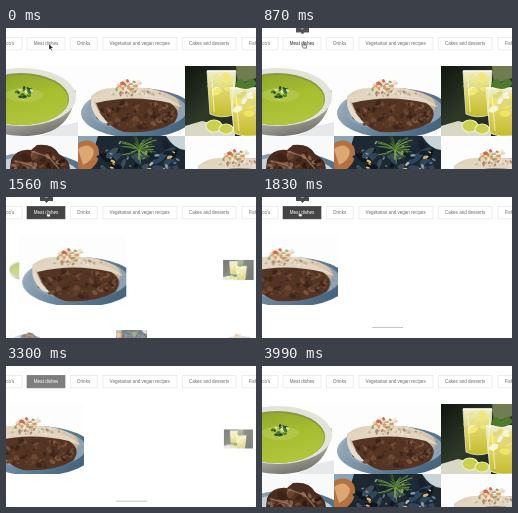
An HTML page for the animation above (4.02 s loop, 250 by 141 pixels).

```html
<!DOCTYPE html>
<html lang="en">
<head>
<meta charset="utf-8">
<title>Recipe filter</title>
<style>
  html, body { margin: 0; width: 100%; height: 100%; overflow: hidden; background: #fff; }
  #stage { position: relative; width: 250px; height: 141px; overflow: hidden; background: #fff; }
  #stage svg { position: absolute; left: 0; top: 0; display: block; }
  .loop, .tile { animation: 4020ms infinite linear; }

  #grid { position: absolute; left: 0; top: 38px; width: 250px; overflow: hidden; animation-name: shrink; }
  .tile { position: absolute; width: 107px; height: 70px; overflow: hidden; animation-name: hide, fade; }
  #kept { z-index: 1; animation-name: slide; }
  #rule { position: absolute; left: 110px; top: 123px; width: 31px; height: 1px; background: #c4c4c4; animation-name: drop; }
  .soft { filter: blur(.4px); }

  text { font: 4.55px "Liberation Sans", Arial, sans-serif; fill: #6c6c6c; }
  .btn { fill: #fff; stroke: #e2e2e2; stroke-width: .6; }
  #pick { animation-name: pick; }
  #pickText { animation-name: pickText; }
  .tip text { fill: #fff; text-anchor: middle; }
  #tipA { animation-name: tipA; }
  #tipB { animation-name: tipB; }
  #cursor { animation-name: point; }
  #arrow { animation-name: arrow; }
  #hand { animation-name: hand; }
  #ring { transform-origin: 41px 15px; animation-name: ring; }

  /* Filtering runs at 1308 ms and is undone at 3187 ms */
  @keyframes hide {
    0%, 32.54% { transform: scale(1); animation-timing-function: ease; }
    47.46%, 79.28% { transform: scale(0); animation-timing-function: ease; }
    94.2%, 100% { transform: scale(1); }
  }
  @keyframes fade {
    0%, 32.54% { opacity: 1; }
    47.46%, 79.28% { opacity: 0; animation-timing-function: cubic-bezier(0, .5, .5, 1); }
    94.2%, 100% { opacity: 1; }
  }
  @keyframes slide {
    0%, 34.08% { transform: none; animation-timing-function: ease; }
    49%, 81.05% { transform: translateX(-107px); animation-timing-function: ease; }
    95.97%, 100% { transform: none; }
  }
  @keyframes shrink {
    0%, 34.08% { height: 280px; animation-timing-function: ease; }
    49%, 81.05% { height: 70px; animation-timing-function: ease; }
    95.97%, 100% { height: 280px; }
  }
  @keyframes drop {
    0%, 34.08% { transform: translateY(210px); animation-timing-function: ease; }
    49%, 81.05% { transform: none; animation-timing-function: ease; }
    95.97%, 100% { transform: translateY(210px); }
  }
  @keyframes pick {
    0%, 32.34% { fill: #fff; stroke: #e2e2e2; animation-timing-function: ease; }
    38.3%, 80.85% { fill: #444; stroke: #444; animation-timing-function: ease; }
    87%, 100% { fill: #fff; stroke: #e2e2e2; }
  }
  @keyframes pickText {
    0%, 15.4% { fill: #6c6c6c; }
    20%, 32.34% { fill: #2c2c2c; }
    36%, 82.5% { fill: #fff; }
    87%, 100% { fill: #6c6c6c; }
  }
  @keyframes tipA {
    0%, 15.4% { transform: translateY(9px); opacity: 0; animation-timing-function: ease; }
    24%, 52.7% { transform: none; opacity: 1; animation-timing-function: ease; }
    57%, 100% { transform: translateY(9px); opacity: 0; }
  }
  @keyframes tipB {
    0%, 54.9% { transform: translateY(9px); opacity: 0; animation-timing-function: ease; }
    57.3% { transform: translateY(4.6px); opacity: .95; }
    62%, 63.5% { transform: none; opacity: 1; }
    67%, 100% { transform: translateY(9px); opacity: 0; }
  }
  @keyframes point {
    0% { transform: translate(43px, 16px); opacity: 1; }
    7.46%, 13% { transform: translate(41.6px, 15.2px); opacity: 1; }
    17%, 43.5% { transform: translate(41px, 14.5px); opacity: 1; }
    57.46% { transform: translate(12.4px, 13.2px); opacity: 1; }
    63.4% { transform: translate(-8px, 12.4px); opacity: 1; }
    63.5%, 100% { transform: translate(-8px, 12.4px); opacity: 0; }
  }
  @keyframes arrow { 0%, 15.4% { opacity: 1; } 15.41%, 100% { opacity: 0; } }
  @keyframes hand { 0%, 15.4% { opacity: 0; } 15.41%, 100% { opacity: 1; } }
  @keyframes ring {
    0%, 7.46% { transform: scale(.5); opacity: 0; }
    8.5% { transform: scale(.7); opacity: 1; }
    10.2%, 11.5% { transform: scale(1); opacity: 1; }
    15%, 100% { transform: scale(1.1); opacity: 0; }
  }
</style>
</head>
<body>
<div id="stage">
  <svg width="0" height="0">
    <defs>
      <linearGradient id="bowlShade" x2=".6" y2="1">
        <stop offset="0" stop-color="#dcdcd6"/><stop offset=".6" stop-color="#b9b8b0"/><stop offset="1" stop-color="#77766e"/>
      </linearGradient>
      <linearGradient id="soupShade" x1=".2" x2=".7" y2="1">
        <stop offset="0" stop-color="#8ea62c"/><stop offset=".5" stop-color="#a5bd2f"/><stop offset="1" stop-color="#b3c63c"/>
      </linearGradient>
      <linearGradient id="plateShade" x2="1" y2=".4">
        <stop offset="0" stop-color="#a9b8c4"/><stop offset=".5" stop-color="#6f8a9f"/><stop offset="1" stop-color="#46657f"/>
      </linearGradient>
      <linearGradient id="breadShade" x2="0" y2="1">
        <stop offset="0" stop-color="#e6dac6"/><stop offset="1" stop-color="#b9a082"/>
      </linearGradient>
      <linearGradient id="nightShade" x2="1" y2=".7">
        <stop offset="0" stop-color="#10150f"/><stop offset=".45" stop-color="#2f3a2a"/><stop offset="1" stop-color="#141a12"/>
      </linearGradient>
      <linearGradient id="juiceShade" x2="0" y2="1">
        <stop offset="0" stop-color="#eef0cf"/><stop offset=".4" stop-color="#dfd86a"/><stop offset="1" stop-color="#c4bb2c"/>
      </linearGradient>

      <g id="soup">
        <rect width="107" height="70" fill="#fdfdfd"/>
        <path d="M70 70 90 60 107 56V70Z" fill="#e6e8e9"/>
        <path d="M-2 28C0 58 24 70 52 70S102 60 105 24Z" fill="url(#bowlShade)"/>
        <ellipse cx="51" cy="31" rx="54" ry="29" fill="#e3e3dc"/>
        <ellipse cx="50" cy="33" rx="48" ry="26" fill="#8a9a3c"/>
        <ellipse cx="50" cy="34" rx="47" ry="25" fill="url(#soupShade)"/>
        <path d="M33 28Q53 15 73 28 68 37 53 36 38 36 33 28Z" fill="#bccb58" opacity=".6"/>
        <g class="herbs soft"></g>
      </g>

      <g id="wrap">
        <rect width="107" height="70" fill="#fdfdfd"/>
        <ellipse cx="60" cy="47" rx="57" ry="25" fill="url(#plateShade)"/>
        <ellipse cx="59" cy="44" rx="50" ry="20" fill="#8ca2b3"/>
        <path d="M13 30Q24 20 42 22 78 19 98 32 105 38 98 48L26 51Q13 40 13 30Z" fill="url(#breadShade)"/>
        <g class="salsa soft"></g>
        <path d="M13 30Q36 22 64 26 90 29 104 41 82 34 59 34L25 38Q15 38 13 30Z" fill="#e2d6c3"/>
        <g class="grill soft"></g>
        <path d="M18 37Q54 28 92 37 105 45 96 57 76 68 46 66 27 61 18 37Z" fill="#543524"/>
        <g class="meat soft"></g>
        <path d="M14 31Q19 46 30 57 24 59 17 49 11 39 14 31Z" fill="#e6dccd"/>
      </g>

      <g id="drink">
        <rect width="107" height="70" fill="url(#nightShade)"/>
        <path d="M51 0H71V12L53 18Z" fill="#8f9a62" opacity=".7"/>
        <path d="M0 60 17 55 50 62 50 70H0Z" fill="#d7d9c6"/>
        <path d="M22 5H51L48 49Q36 53 25 48Z" fill="url(#juiceShade)" stroke="#e9edda" stroke-width=".8"/>
        <path d="M45 22H82L77 68Q62 73 49 67Z" fill="url(#juiceShade)" stroke="#edf0e0" stroke-width=".9"/>
        <g class="ice soft"></g>
        <path d="M22 5h29M45 22h37" stroke="#fafaf0" stroke-width="1.4"/>
        <path d="M50 20Q54 7 60 17 67 8 72 18 62 27 50 20Z" fill="#4e7a2c"/>
        <path d="M27 12l2 34m20-32-2 33m4-18 3 36" stroke="#fbfbe0" stroke-width="1.2" opacity=".6"/>
        <g fill="#c9d04e" stroke="#eef0b4" stroke-width="1.2">
          <ellipse cx="29" cy="60" rx="8" ry="6"/><ellipse cx="41" cy="63" rx="7" ry="5"/>
        </g>
      </g>

      <g id="roast">
        <rect width="107" height="70" fill="#f8f9fa"/>
        <ellipse cx="62" cy="44" rx="58" ry="28" fill="url(#plateShade)"/>
        <ellipse cx="61" cy="42" rx="49" ry="22" fill="#c5d2dc"/>
        <path d="M40 24Q46 12 60 14L66 9Q82 7 88 18 102 25 98 40L60 60 38 42Z" fill="#4a2c1e"/>
        <g class="roastMeat soft"></g>
        <path d="M60 15 78 21 88 33M44 25 60 29 70 38" fill="none" stroke="#b98f76" stroke-width="1.3" opacity=".6"/>
      </g>

      <g id="mussels">
        <rect width="107" height="70" fill="#1d2831"/>
        <path d="M0 0H20L9 37H0Z" fill="#8aa3b5"/>
        <path d="M0 7Q13 0 20 11 24 24 13 33L0 36Z" fill="#b3713f"/>
        <path d="M0 13Q11 5 16 15 16 24 5 29Z" fill="#d9a873"/>
        <g class="shells soft"></g>
        <g class="dill" fill="none" stroke-width=".9"></g>
        <path d="M88 0H107V14Q96 13 88 0Z" fill="#c9d4da"/>
      </g>
    </defs>
  </svg>

  <div id="grid" class="loop"></div>
  <div id="rule" class="loop"></div>

  <svg width="250" height="141" viewBox="0 0 250 141">
    <g id="bar"></g>
    <g id="tipA" class="tip loop">
      <path d="M34-6H47V4H42.3L40.5 6 38.7 4H34Z" fill="#484848"/><text x="40.5" y=".5">2</text>
    </g>
    <g id="tipB" class="tip loop">
      <path d="M-5-6H8V4H3.3L1.5 6-.3 4H-5Z" fill="#484848"/><text x="1.8" y=".5">3</text>
    </g>
    <circle id="ring" class="loop" cx="41" cy="15" r="7.8" fill="none" stroke="#444" stroke-width=".8"/>
    <g id="cursor" class="loop">
      <path id="arrow" class="loop" d="M0 0V5.6L1.3 4.4 2.2 6.3 3.1 5.9 2.3 4.1H4Z" fill="#111" stroke="#fff" stroke-width=".35"/>
      <path id="hand" class="loop" d="M0 .5Q.6-.2 1.1.5V2.3L3.3 2.8Q3.8 3 3.7 3.6L3.2 5.6H.6L-1.1 3.5Q-.9 2.8 0 3.2Z" fill="#fff" stroke="#111" stroke-width=".6"/>
    </g>
  </svg>
</div>

<script>
  const NS = "http://www.w3.org/2000/svg";
  const $ = s => document.querySelector(s);

  function add(parent, tag, attrs) {
    const el = document.createElementNS(NS, tag);
    for (const k in attrs) el.setAttribute(k, attrs[k]);
    parent.append(el);
    return el;
  }

  function seeded(n) {
    return () => (n = (n * 16807) % 2147483647) / 2147483647;
  }

  // Scatter small ellipses inside an elliptical patch
  function scatter(sel, seed, count, [cx, cy, rx, ry], [min, max], colors, flat = .62) {
    const rnd = seeded(seed), box = $(sel);
    rnd();
    for (let i = 0; i < count; i++) {
      const a = rnd() * 2 * Math.PI, d = Math.sqrt(rnd()), r = min + rnd() * (max - min);
      const x = cx + Math.cos(a) * d * rx, y = cy + Math.sin(a) * d * ry;
      add(box, "ellipse", {
        cx: x, cy: y, rx: r, ry: r * flat, fill: colors[Math.floor(rnd() * colors.length)],
        transform: `rotate(${rnd() * 140 - 70} ${x} ${y})`
      });
    }
  }

  // Feathery sprigs fanning out from one stem
  function sprigs(sel, seed, count, cx, cy) {
    const rnd = seeded(seed), greens = ["#5f8a3c", "#7ba04b", "#3f6b2d"];
    rnd();
    for (let i = 0; i < count; i++) {
      const a = rnd() * 2 * Math.PI, len = 6 + rnd() * 9;
      const dx = Math.cos(a) * len * 1.5, dy = Math.sin(a) * len;
      add($(sel), "path", {
        d: `M${cx} ${cy}q${dx * .4} ${dy * .8} ${dx} ${dy}`, stroke: greens[i % 3]
      });
    }
  }

  const browns = ["#5f3d2a", "#6d4833", "#3c251a", "#4f3223", "#7a543c", "#452a1d"];
  scatter(".herbs", 71, 24, [53, 27, 9, 5.5], [1, 2.6], ["#2b5a22", "#477a28", "#dfe6b4", "#20481e"]);
  scatter(".salsa", 37, 40, [51, 20, 14, 5], [1.4, 3.2], ["#cf6a4a", "#dd9a62", "#8fa565", "#efe7da", "#e6d7bd"]);
  scatter(".grill", 43, 30, [62, 27, 30, 4], [.7, 2], ["#c9b294", "#a98a66", "#efe6d8"]);
  scatter(".meat", 19, 110, [59, 49, 38, 14], [1, 3.6], browns);
  scatter(".roastMeat", 53, 60, [68, 31, 26, 16], [1.5, 5], ["#3c2318", "#54331f", "#6b4532", "#2e1a13", "#85604a"]);
  scatter(".ice", 29, 12, [36, 18, 10, 10], [2, 5], ["#f6f5dc", "#f1e775", "#e2dc92"]);
  scatter(".ice", 61, 16, [63, 38, 12, 13], [2, 6], ["#f6f5dc", "#f1e460", "#e0d878"]);
  scatter(".shells", 91, 60, [59, 34, 43, 34], [4, 9], ["#0e161f", "#1c2b39", "#2f475c", "#15212b", "#3c4e59"], .4);
  scatter(".shells", 23, 36, [60, 31, 42, 29], [1, 3], ["#c98a4d", "#a9b6bc", "#dcb374", "#5a7f9b", "#7f97a6"], .5);
  sprigs(".dill", 17, 42, 61, 13);

  const tiles = [
    ["soup", -35, 0], ["drink", 179, 0], ["roast", -35, 70],
    ["mussels", 72, 70], ["wrap", 179, 70], ["wrap", 72, 0, "kept"]
  ];
  for (const [pic, x, y, id] of tiles) {
    const tile = document.createElement("div");
    tile.className = "tile";
    if (id) tile.id = id;
    tile.style.left = x + "px";
    tile.style.top = y + "px";
    const svg = add(tile, "svg", { width: 107, height: 70, viewBox: "0 0 107 70" });
    add(svg, "use", { href: "#" + pic });
    $("#grid").append(tile);
  }

  const filters = [
    ["Taco's", -12, 16, -4.6], ["Meat dishes", 21, 59, 27.8], ["Drinks", 64.7, 91.2, 71.3],
    ["Vegetarian and vegan recipes", 97, 171, 103.6], ["Cakes and desserts", 176.6, 230, 183],
    ["Fish", 236, 259, 242.8]
  ];
  filters.forEach(([label, left, right, textX], i) => {
    const rect = add($("#bar"), "rect", { class: "btn", x: left, y: 9.3, width: right - left, height: 12.6 });
    const text = add($("#bar"), "text", { x: textX, y: 17.2 });
    text.textContent = label;
    if (i === 1) {
      rect.id = "pick";
      text.id = "pickText";
      rect.classList.add("loop");
      text.classList.add("loop");
    }
  });
</script>
</body>
</html>
```
